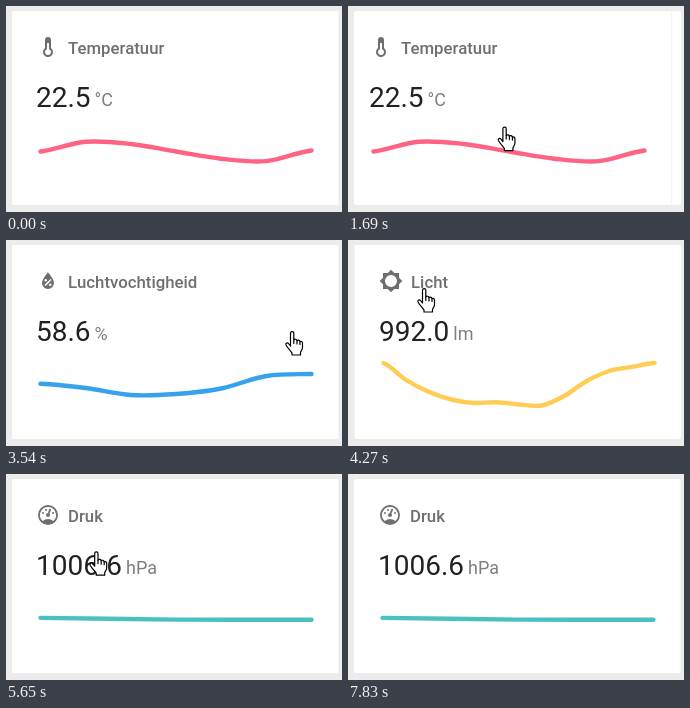
These frames come from a looping animation (336x206 px, 8.36 s). An HTML page:

```html
<!DOCTYPE html>
<html lang="nl">
<head>
<meta charset="utf-8">
<style>
  html, body { margin: 0; width: 100%; height: 100%; overflow: hidden; background: #ececec; }
  svg { display: block; width: 336px; height: 206px; font-family: Roboto, sans-serif; }
  .icon { fill: #6f6f6f; fill-rule: evenodd; }
  .name { font-size: 16.8px; font-weight: 500; fill: #6f6f6f; }
  .value { font-size: 28px; fill: #212121; }
  .unit { font-size: 18px; fill: #7f7f7f; }
  .graph { fill: none; stroke-width: 4.4; stroke-linecap: round; stroke-linejoin: round; }
</style>
</head>
<body>
<svg viewBox="0 0 336 206">
  <clipPath id="frame"><rect x="6" y="5" width="327" height="194" rx="2"/></clipPath>
  <g clip-path="url(#frame)"><g id="track"></g></g>
  <g id="hand" fill="#fff" stroke="#000" stroke-width="1.2" stroke-linejoin="round" stroke-linecap="round">
    <path d="M5.5 15V2.3C5.5 .1 8.8 .1 8.8 2.3V9C9.3 7.8 11.8 8 12 9.6C12.6 8.6 14.8 9 15 10.7C15.8 10 17.5 10.6 17.5 12.2V16.5C17.5 19 15.8 20 15.5 21.5V24H7V22C6 20 2.5 17 1 14C.3 12 2.4 11 3.6 12.6Z"/>
    <path fill="none" d="M8.8 9V12.5M12 9.6V13M15 10.7V13.5"/>
  </g>
</svg>
<script>
const LOOP = 8360, WIDTH = 327, HOLD = 250, SETTLE = 300;
const ENTER = 580, LEAVE = 7830;
const track = document.getElementById('track');
const hand = document.getElementById('hand');

const dot = (x, y, r) => `M${x} ${y - r}a${r} ${r} 0 0 0 0 ${2 * r}a${r} ${r} 0 0 0 0 ${-2 * r}Z`;

const icons = {
  thermometer: 'M17 17A5 5 0 1 1 9 13V5A3 3 0 0 1 15 5V13A5 5 0 0 1 17 17M11 8V14.17A3 3 0 1 0 13 14.17V8Z',
  drop: 'M12 3.25Q6 10.5 6 14A6 6 0 0 0 18 14Q18 10.5 12 3.25M14.47 9.97L15.53 11.03L9.53 17.03L8.47 15.97Z'
    + dot(9.75, 11.25, 1.25) + dot(14.25, 15.75, 1.25),
  sun: 'M20 15.31L23.31 12L20 8.69V4H15.31L12 .69L8.69 4H4V8.69L.69 12L4 15.31V20H8.69L12 23.31L15.31 20H20Z'
    + dot(12, 12, 6),
  gauge: dot(12, 12, 10) + 'M12 4A8 8 0 0 1 17.3 18Q12 14 6.7 18A8 8 0 0 1 12 4'
    + 'M13.1 6.5L11.9 9.9L13.4 10.5L15 7.3A1 1 0 0 0 13.1 6.5'
    + dot(12, 12, 2) + dot(10, 7, 1) + dot(7, 10, 1) + dot(17, 10, 1)
};

// Levels are evenly spaced readings, given as heights on the stage
const cards = [
  { name: 'Temperatuur', value: '22.5', unit: '°C', color: '#ff6384', icon: 'thermometer',
    levels: [145.5, 135.8, 138, 145.5, 152.7, 155.1, 144.5] },
  { name: 'Luchtvochtigheid', value: '58.6', unit: '%', color: '#36a2eb', icon: 'drop',
    levels: [143.8, 148, 155, 154, 148.5, 136, 134] },
  { name: 'Licht', value: '992.0', unit: 'lm', color: '#ffcd56', icon: 'sun',
    levels: [123, 140, 151.8, 159.5, 163, 162.2, 164.5, 165.5, 156, 141, 131, 126.8, 123] },
  { name: 'Druk', value: '1006.6', unit: 'hPa', color: '#4bc0c0', icon: 'gauge',
    levels: [143.9, 145.6, 145.7] }
];

// Smooth curve through the levels
function curve(levels) {
  const last = levels.length - 1, dx = 271 / last;
  const level = i => levels[Math.max(0, Math.min(last, i))];
  const slope = i => (level(i + 1) - level(i - 1)) / 6;
  return levels.slice(1).reduce((d, y, i) => {
    const x = 34.5 + i * dx;
    return d + `C${x + dx / 3} ${level(i) + slope(i)} ${x + dx * 2 / 3} ${y - slope(i + 1)} ${x + dx} ${y}`;
  }, `M34.5 ${levels[0]}`);
}

track.innerHTML = cards.map((c, i) => `
  <g transform="translate(${i * WIDTH})">
    <rect x="6" y="5" width="${WIDTH}" height="194" fill="#fff"/>
    <path d="M332.5 5V199" stroke="#f4f4f4"/>
    <path class="icon" transform="translate(30 29)" d="${icons[c.icon]}"/>
    <text class="name" x="62" y="48">${c.name}</text>
    <text class="value" x="30" y="101">${c.value}<tspan class="unit" dx="4" dy="-1">${c.unit}</tspan></text>
    <path class="graph" stroke="${c.color}" d="${curve(c.levels)}"/>
  </g>`).join('');

// Pointer moves; those with a card are swipes that settle on it
const moves = [
  { from: 540, to: 860, x: 286, y: 129 },
  { from: 1260, to: 1560, x: 127, y: 121, card: 0 },
  { from: 1560, to: 2080, x: 280, y: 118 },
  { from: 2330, to: 2700, x: 0, y: 94, card: 1 },
  { from: 2700, to: 3480, x: 279, y: 91 },
  { from: 3770, to: 4270, x: 69, y: 48, card: 2 },
  { from: 4270, to: 4820, x: 275, y: 90 },
  { from: 4920, to: 5620, x: 79, y: 77, card: 3 },
  { from: 5620, to: 5930, x: 262, y: 86 },
  { from: 6140, to: 6600, x: 53, y: 58, card: 3 },
  { from: 6600, to: 7320, x: 290, y: 204 }
];

// The picture refreshes in bursts: [start, interval]
const bursts = [[ENTER, 140], [1300, 130], [2370, 130], [3820, 150], [4960, 138], [6200, 140]];

function refreshed(time) {
  const burst = bursts.filter(b => b[0] <= time).pop();
  if (!burst) return 0;
  const [start, interval] = burst;
  return start + Math.floor((time - start) / interval) * interval;
}

function pointer(t) {
  let x = 330, y = 200;
  for (const m of moves) {
    if (t <= m.from) break;
    const k = Math.min(1, (t - m.from) / (m.to - m.from));
    const ease = (1 - Math.cos(Math.PI * k)) / 2;
    x += (m.x - x) * ease;
    y += (m.y - y) * ease;
  }
  return { x, y };
}

function scroll(t) {
  const swipes = moves.filter(m => 'card' in m && m.from <= t);
  const swipe = swipes.pop();
  if (!swipe) return 0;
  const before = swipes.length ? swipes.pop().card : 0;
  const release = swipe.from + HOLD;
  const pull = pointer(swipe.from).x - pointer(Math.min(t, release)).x;
  const atEnd = before === cards.length - 1;
  const dragged = before * WIDTH + (atEnd ? pull ** 0.85 : pull);
  const target = swipe.card * WIDTH;
  if (t <= release) return dragged;
  return target + (dragged - target) * (1 - Math.min(1, (t - release) / SETTLE)) ** 3;
}

function draw(time) {
  const t = refreshed(time);
  const { x, y } = pointer(t);
  track.setAttribute('transform', `translate(${-Math.round(scroll(t))})`);
  hand.setAttribute('transform', `translate(${x} ${y})`);
  hand.style.display = time >= ENTER && time < LEAVE ? '' : 'none';
}

const start = performance.now();
function tick() {
  draw((performance.now() - start) % LOOP);
  requestAnimationFrame(tick);
}
tick();
</script>
</body>
</html>
```
